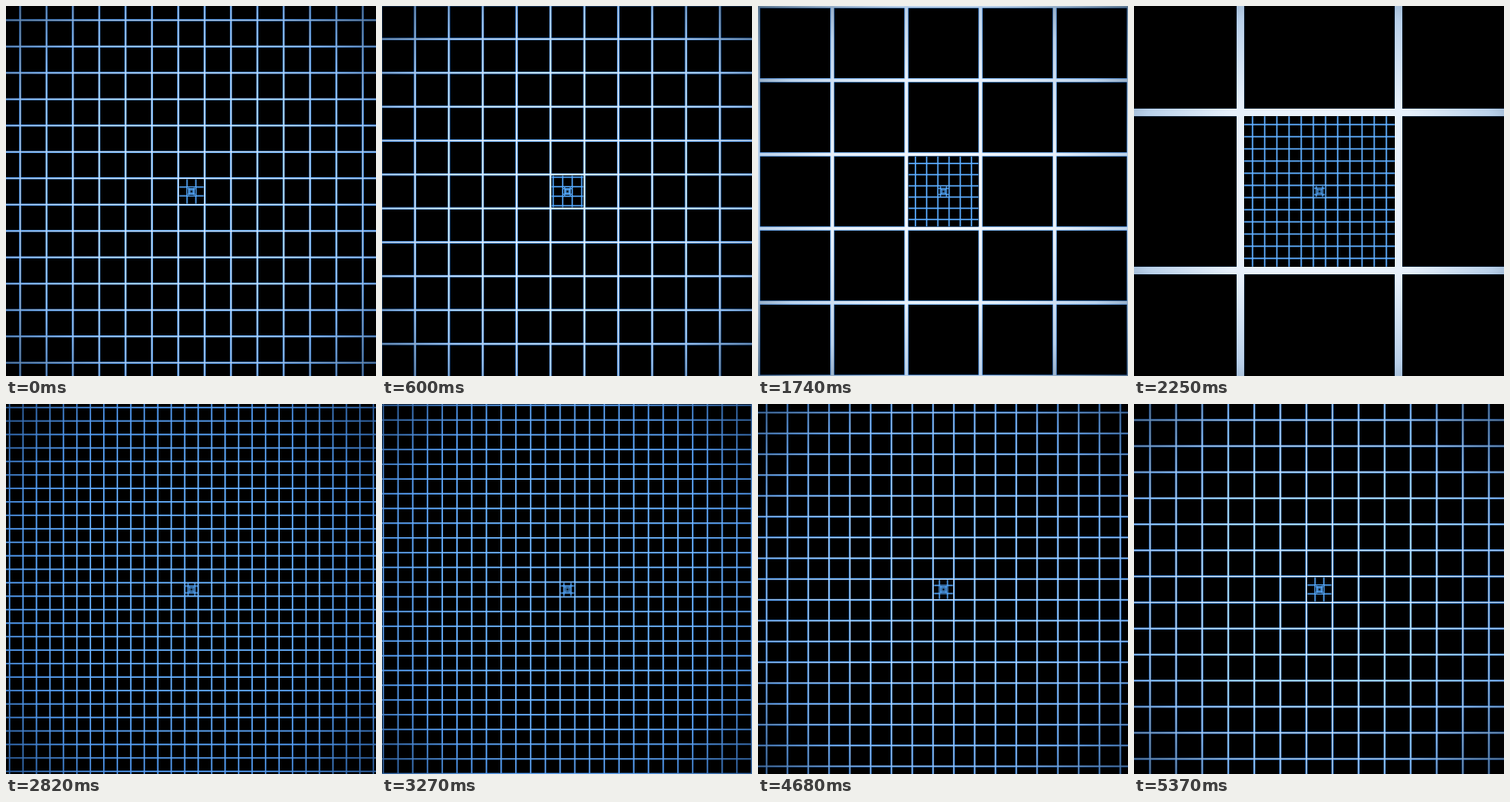
Animation of 400x400 px, one loop 5.4 s. Source, as an HTML page with a canvas:

```html
<!DOCTYPE html>
<html>
<head>
<meta charset="utf-8">
<title>Endless grid</title>
<style>
html, body { margin: 0; width: 100%; height: 100%; overflow: hidden; background: #000; }
canvas { display: block; width: 400px; height: 400px; }
</style>
</head>
<body>
<canvas id="stage" width="400" height="400"></canvas>
<script>
const ctx = document.getElementById('stage').getContext('2d');
const LOOP = 5400, STEP = 30;
const CENTER = 200.5;
const GAP = 14.245;     // cell size one layer away from the camera

const shade = ctx.createRadialGradient(CENTER, CENTER, 0, CENTER, CENTER, 283);
shade.addColorStop(0, 'rgb(255,255,255)');
shade.addColorStop(0.45, 'rgb(238,246,253)');
shade.addColorStop(0.72, 'rgb(192,214,236)');
shade.addColorStop(1, 'rgb(95,122,146)');

// Bars centred on the cell borders, kept inside a square of half size h
function bars(cell, width, h, color) {
  ctx.fillStyle = color;
  for (let p = cell / 2; p - width / 2 < h; p += cell) {
    const a = p - width / 2;
    const w = Math.min(width, h - a);
    for (const x of [a, -a - w]) {
      ctx.fillRect(x, -h, w, 2 * h);
      ctx.fillRect(-h, x, 2 * h, w);
    }
  }
}

function draw(time) {
  const t = Math.floor((time % LOOP) / STEP) * STEP;
  let depth = (LOOP / 2 - t) / LOOP;
  if (depth <= 0) depth += 1;

  ctx.setTransform(1, 0, 0, 1, CENTER, CENTER);
  let h = 201;
  for (let n = 0; n < 7 && h > 1; n++, depth++) {
    const cell = GAP / depth;
    const rim = cell * 0.043 + 0.95;
    const core = cell * 0.05 - 0.55;
    ctx.fillStyle = '#000';
    ctx.fillRect(-h, -h, 2 * h, 2 * h);
    bars(cell, rim, h, 'rgb(85,170,255)');
    if (core > 0) bars(cell, core, h, 'rgb(246,248,252)');
    h = Math.min(h, (cell - rim) / 2);
  }

  ctx.setTransform(1, 0, 0, 1, 0, 0);
  ctx.globalCompositeOperation = 'multiply';
  ctx.fillStyle = shade;
  ctx.fillRect(0, 0, 400, 400);
  ctx.globalCompositeOperation = 'source-over';
}

const start = performance.now();
function tick() {
  draw(performance.now() - start);
  requestAnimationFrame(tick);
}
tick();
</script>
</body>
</html>
```
